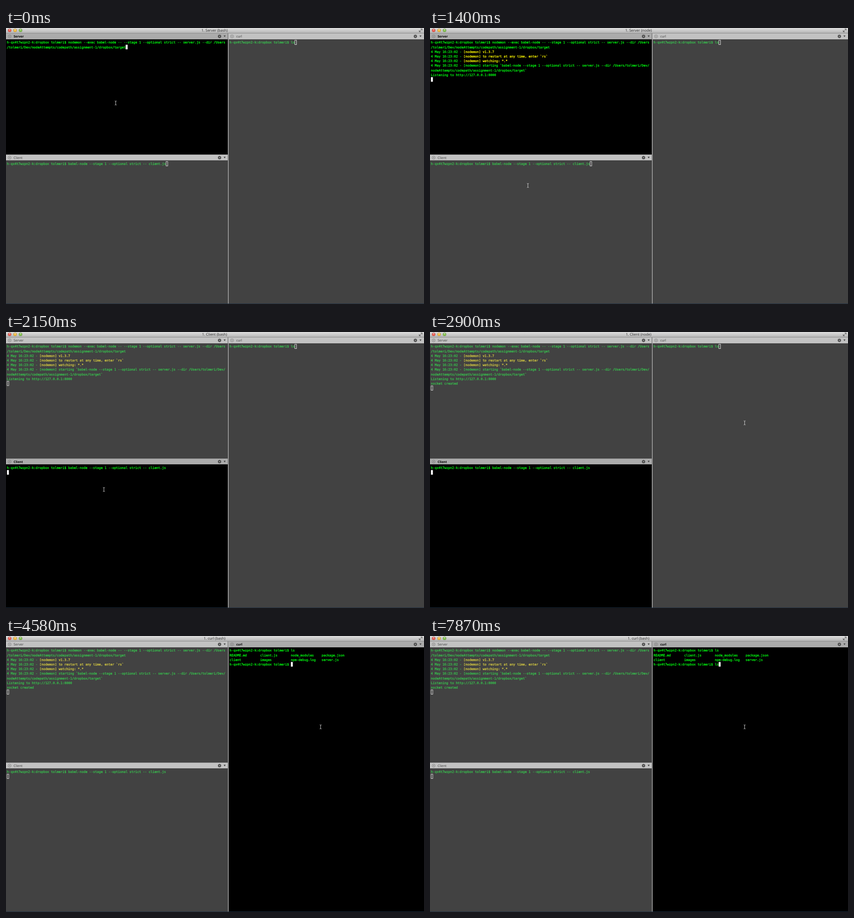
These frames come from a looping animation (920 px wide and 609 px high, 8 s). An HTML page with a canvas:

```html
<!DOCTYPE html>
<html lang="en">
<head>
<meta charset="utf-8">
<title>Terminal panes</title>
<style>
html, body { margin: 0; width: 100%; height: 100%; overflow: hidden; background: #424242; }
canvas { display: block; }
</style>
</head>
<body>
<canvas id="stage" width="920" height="609"></canvas>
<script>
const ctx = document.getElementById('stage').getContext('2d');
const LOOP = 8000, CELL = 4.215, ROW = 10.21;
const MONO = '7px "DejaVu Sans Mono", monospace';
const SANS = '"Open Sans", sans-serif';

const USER = 'tolmeri';
const PROMPT = `h-qx4t7wzpn2-k:dropbox ${USER}$ `;
const STAMP = '4 May 16:23:02 - [nodemon] ';
const columns = (...names) => names.map(n => n.padEnd(16)).join('').trimEnd();

// Each step is [time, value...]; the latest one reached is in force.
const at = (steps, t) => steps.findLast(s => t >= s[0]);

const titles = [[0, 'Server (bash)'], [1250, 'Server (node)'], [1550, 'Client (bash)'],
  [2750, 'Client (node)'], [3500, 'curl (bash)']];
const focus = [[0, 'Server'], [1550, 'Client'], [3350, 'curl']];
const mouse = [[0, 241, 165.5], [1100, 226, 254], [1250, 215, 347.5], [2450, 231, 347],
  [2600, 545, 257], [2750, 661, 209], [2900, 692, 200.5]];

// Lines printed in each pane; the cursor follows the last one.
const serverLog = [
  [0, PROMPT + 'nodemon --exec babel-node -- --stage 1 --optional strict -- server.js --dir /Users'],
  [0, `/${USER}/Dev/nodeAttempts/codepath/assignment-1/dropbox/target`],
  [650, STAMP + 'v1.3.7'],
  [650, STAMP + 'to restart at any time, enter `rs`'],
  [650, STAMP + 'watching: *.*'],
  [650, STAMP + `starting \`babel-node --stage 1 --optional strict -- server.js --dir /Users/${USER}/Dev/`],
  [650, 'nodeAttempts/codepath/assignment-1/dropbox/target`'],
  [1400, 'Listening to http://127.0.0.1:8000'],
  [2750, 'socket created']
];
const clientLog = [[0, PROMPT + 'babel-node --stage 1 --optional strict -- client.js']];
const curlLog = [
  [0, PROMPT + 'ls'],
  [4580, columns('README.md', 'client.js', 'node_modules', 'package.json')],
  [4580, columns('client', 'images', 'npm-debug.log', 'server.js')]
];
const curlInput = [[4580, ''], [5780, 'ls'], [6080, 'clear'], [6530, 'rm -rf target/'],
  [6830, 'rm -rf dir/'], [7280, 'ls target/'], [7870, 'ls']];

const panes = [
  { name: 'Server', x: 0, y: 12, w: 488, h: 267, log: serverLog, enter: 500 },
  { name: 'Client', x: 0, y: 279.7, w: 488, h: 328.3, log: clientLog, enter: 2150 },
  { name: 'curl', x: 490, y: 12, w: 430, h: 596, log: curlLog, enter: 4580, input: curlInput }
];

function rect(x, y, w, h, color) {
  ctx.fillStyle = color;
  ctx.fillRect(x, y, w, h);
}

function disc(x, y, r, color) {
  ctx.fillStyle = color;
  ctx.beginPath();
  ctx.arc(x, y, r, 0, 7);
  ctx.fill();
}

function lines(color, width, ...paths) {
  ctx.strokeStyle = color;
  ctx.lineWidth = width;
  ctx.beginPath();
  for (const [x, y, ...rest] of paths) {
    ctx.moveTo(x, y);
    for (let i = 0; i < rest.length; i += 2) ctx.lineTo(rest[i], rest[i + 1]);
  }
  ctx.stroke();
}

function label(text, x, y, font, color, align = 'left') {
  ctx.font = font;
  ctx.fillStyle = color;
  ctx.textAlign = align;
  ctx.fillText(text, x, y);
}

function gear(x, y, color) {
  const spokes = Array.from({ length: 4 }, (_, i) => {
    const dx = 4 * Math.cos(i * Math.PI / 4), dy = 4 * Math.sin(i * Math.PI / 4);
    return [x - dx, y - dy, x + dx, y + dy];
  });
  lines(color, 1.4, ...spokes);
  disc(x, y, 2.9, color);
  disc(x, y, 1.2, '#b8b8b8');
}

function titleBar(t) {
  const shade = ctx.createLinearGradient(0, 0, 0, 12);
  shade.addColorStop(0, '#dedede');
  shade.addColorStop(1, '#b2b2b2');
  rect(0, 0, 920, 12, shade);
  rect(0, 11, 920, 1, '#8c8c8c');
  ['#e9594f', '#efb83c', '#7fbe4b'].forEach((color, i) => {
    disc(8 + 12 * i, 5.2, 3.9, '#0005');
    disc(8 + 12 * i, 5.2, 3.5, color);
    disc(8 + 12 * i, 3.8, 1.4, '#fff9');
  });
  label('1. ' + at(titles, t)[1], 459, 8.2, '8px ' + SANS, '#2c2c2c', 'center');
  lines('#555', 1, [909.5, 8.5, 916, 2], [912.5, 2, 916, 2, 916, 5.5], [909.5, 5, 909.5, 8.5, 913, 8.5]);
}

function tabBar({ name, x, y, w }, active) {
  const top = Math.round(y), bottom = Math.floor(y + 13);
  rect(x, top, w, bottom - top, active ? '#ababab' : '#c2c2c2');
  const cx = x + (x ? 7.5 : 8), cy = y + 6.4, right = x + w;
  ctx.strokeStyle = '#707070';
  ctx.lineWidth = 0.7;
  ctx.beginPath();
  ctx.arc(cx, cy, 3.4, 0, 7);
  ctx.stroke();
  lines('#666', 0.7, [cx - 1.2, cy - 1.2, cx + 1.2, cy + 1.2], [cx - 1.2, cy + 1.2, cx + 1.2, cy - 1.2]);
  label(name, x + 16.7, y + 9.2, (active ? 'bold 7px ' : '7.4px ') + SANS, active ? '#000' : '#444');
  const edge = x ? right - 1 : right;
  gear(edge - 18, cy, '#444');
  ctx.fillStyle = '#444';
  ctx.beginPath();
  ctx.moveTo(edge - 9, cy - 2);
  ctx.lineTo(edge - 4.5, cy - 2);
  ctx.lineTo(edge - 6.75, cy + 1.6);
  ctx.fill();
}

// One character per terminal cell, slightly thickened.
function cells(text, x, y, col, color) {
  ctx.strokeStyle = color;
  ctx.lineWidth = 0.3;
  [...text].forEach((ch, i) => {
    if (ch === ' ') return;
    label(ch, x + (col + i) * CELL, y, MONO, color);
    ctx.strokeText(ch, x + (col + i) * CELL, y);
  });
}

function terminal(pane, active, t) {
  const { x, y, w, h, log, enter, input } = pane;
  const left = x + 2.1, top = y + 14.7, bodyTop = Math.floor(y + 13);
  const green = active ? '#00fa10' : '#38c24e';
  const yellow = active ? '#fffa00' : '#d6cb42';
  rect(x, bodyTop, w, y + h - bodyTop, active ? '#000' : '#424242');

  const shown = log.filter(([time]) => t >= time).map(([, text]) => text);
  let row = shown.length, col = 0;
  if (t < enter) {
    row--;
    col = shown[row].length;
  } else if (input) {
    shown.push(PROMPT + at(input, t)[1]);
    col = shown[row].length;
  }
  shown.forEach((text, i) => {
    const colored = text.startsWith(STAMP) && !text.includes('starting');
    const split = colored ? text.indexOf('[nodemon]') : text.length;
    const base = top + i * ROW + 7.6;
    cells(text.slice(0, split), left, base, 0, green);
    cells(text.slice(split), left, base, split, yellow);
  });

  const cx = left + col * CELL, cy = top + row * ROW;
  if (active) {
    rect(cx, cy, CELL, ROW, '#fff');
  } else {
    ctx.strokeStyle = '#eee';
    ctx.lineWidth = 0.9;
    ctx.strokeRect(cx + 0.3, cy + 0.3, CELL - 0.5, ROW - 0.6);
  }
}

function pointer([, x, y]) {
  const cx = x + 0.5;
  lines('#ccc', 1, [cx - 2, y - 4.5, cx, y - 4, cx, y + 4, cx - 2, y + 4.5],
    [cx + 2, y - 4.5, cx, y - 4], [cx, y + 4, cx + 2, y + 4.5]);
}

function draw() {
  const t = performance.now() % LOOP;
  ctx.textRendering = 'geometricPrecision';
  rect(0, 0, 920, 609, '#424242');
  titleBar(t);
  for (const pane of panes) {
    const active = pane.name === at(focus, t)[1];
    tabBar(pane, active);
    terminal(pane, active, t);
  }
  rect(488, 12, 1, 597, '#666');
  rect(489, 12, 1, 597, '#b8b8b8');
  rect(0, 279, 488, 1, '#888');
  rect(0, 608, 920, 1, '#1d2f42');
  pointer(at(mouse, t));
  requestAnimationFrame(draw);
}
draw();
</script>
</body>
</html>
```
